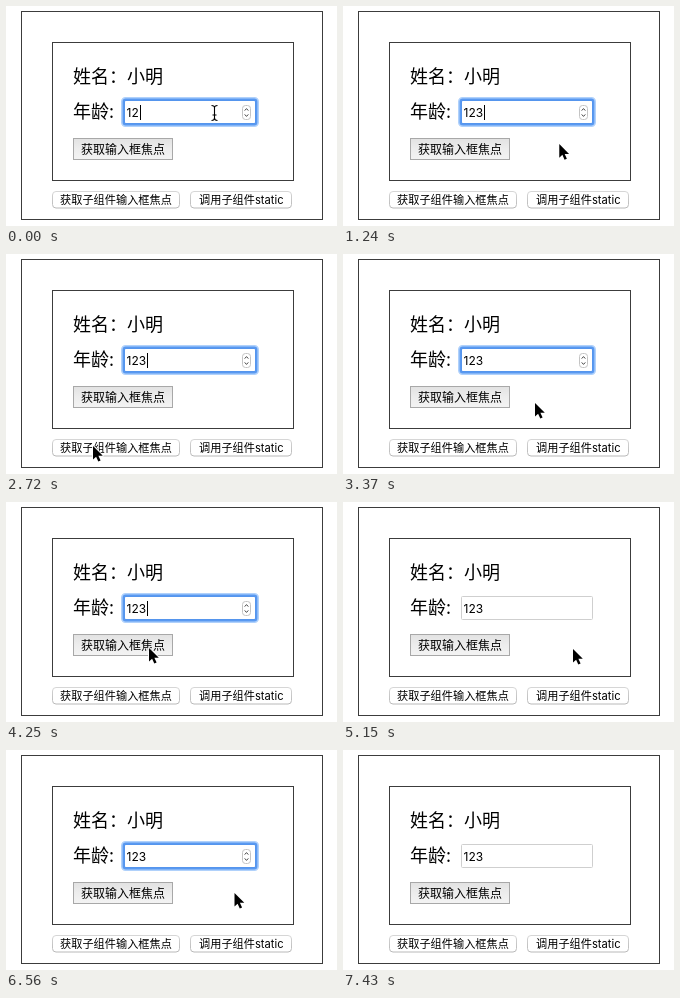
An HTML page for the animation above (7.8 s loop, 331x220 px).

```html
<!DOCTYPE html>
<html lang="zh-CN">
<head>
<meta charset="utf-8">
<title>Focus demo</title>
<style>
html, body { margin: 0; width: 100%; height: 100%; overflow: hidden; background: #fff; }
svg { display: block; width: 331px; height: 220px; }
text { font-family: "Inter", "Noto Sans CJK SC", sans-serif; fill: #000; white-space: pre; }
.label { font: 18px "Noto Sans CJK SC", sans-serif; }
.field { font-size: 12px; }
.small { font-size: 11.2px; }
.frame { fill: none; stroke: #3c3c3c; }
</style>
</head>
<body>
<svg viewBox="0 0 331 220">
  <defs>
    <linearGradient id="gray" x2="0" y2="1">
      <stop offset="0" stop-color="#e2e2e2"/>
      <stop offset=".5" stop-color="#ededed"/>
      <stop offset="1" stop-color="#f3f3f3"/>
    </linearGradient>
    <linearGradient id="blue" x2="0" y2="1">
      <stop offset="0" stop-color="#6db3fa"/>
      <stop offset="1" stop-color="#1a82fb"/>
    </linearGradient>
    <linearGradient id="edge" x2="0" y2="1">
      <stop offset="0" stop-color="#d6d6d6"/>
      <stop offset="1" stop-color="#b8b8b8"/>
    </linearGradient>
  </defs>

  <rect class="frame" x="15.5" y="5.5" width="301" height="208"/>
  <rect class="frame" x="46.5" y="36.5" width="241" height="138"/>
  <text class="label" x="67" y="76.5">姓名：小明</text>
  <text class="label" x="67" y="111.5">年龄:</text>

  <rect x="118.5" y="94.5" width="131" height="23" rx="1" fill="#fff" stroke="#cfcfcf"/>
  <g id="focus">
    <rect x="117" y="93" width="134" height="26" rx="2.5" fill="none" stroke="#3b8cf5" stroke-opacity=".4" stroke-width="4"/>
    <rect x="117.8" y="93.8" width="132.4" height="24.4" rx="2" fill="none" stroke="#4a90f0" stroke-opacity=".85" stroke-width="2.4"/>
    <rect x="236.5" y="99.5" width="8" height="14" rx="3" fill="#fff" stroke="#c4c4c4"/>
    <path d="M238.7 104.6l1.8-2 1.8 2M238.7 108.4l1.8 2 1.8-2" fill="none" stroke="#444"/>
  </g>
  <text class="field" id="value" x="120.6" y="111"></text>
  <rect id="caret" y="99" width="1" height="15"/>

  <rect id="inner" x="67.5" y="132.5" width="99" height="21" fill="url(#gray)" stroke="#a8a8a8"/>
  <text x="75" y="147.5" font-size="12">获取输入框焦点</text>

  <rect id="outer" x="46.5" y="185.5" width="127" height="16.5" rx="3.5" stroke="url(#edge)"/>
  <text class="small" x="54" y="198.2">获取子组件输入框焦点</text>
  <rect x="184.5" y="185.5" width="101" height="16.5" rx="3.5" fill="#fff" stroke="url(#edge)"/>
  <text class="small" x="193" y="198.2">调用子组件static</text>

  <g id="arrow">
    <path d="M0 0V13.6L3.1 10.7 5.3 15.6 7.6 14.6 5.4 9.8H9.8Z" stroke="#fff" stroke-width="1.8" paint-order="stroke" stroke-linejoin="round"/>
  </g>
  <g id="beam" fill="none">
    <path d="M-3 -7.5Q0 -7.5 0 -5V5Q0 7.5 -3 7.5M3 -7.5Q0 -7.5 0 -5V5Q0 7.5 3 7.5M-2 2H2" stroke="#fff" stroke-width="2.4" stroke-opacity=".7"/>
    <path d="M-3 -7.5Q0 -7.5 0 -5V5Q0 7.5 -3 7.5M3 -7.5Q0 -7.5 0 -5V5Q0 7.5 3 7.5M-2 2H2" stroke="#000" stroke-width="1.1"/>
  </g>
</svg>
<script>
const LOOP = 7800;
const $ = id => document.getElementById(id);
const [focus, value, caret, inner, outer, arrow, beam] =
  ["focus", "value", "caret", "inner", "outer", "arrow", "beam"].map($);

// Pointer moves: first step, last step, step count, end point.
const start = [208.5, 107];
const moves = [
  [1020, 1300, 6, 219, 149],
  [2010, 2130, 3, 88, 193],
  [2300, 2300, 1, 87, 192],
  [3020, 3370, 7, 192, 149],
  [3780, 3840, 2, 143, 146],
  [4670, 4790, 3, 230, 147],
  [5380, 5730, 7, 127, 192],
  [6380, 6560, 4, 228.5, 143],
  [7100, 7430, 7, 254, 224]
];
const focused = [[0, 1480], [2720, 3480], [4250, 5150], [5960, 6740]];
const caretOn = [[0, 480], [840, 1300], [2720, 3253], [4250, 4790], [5960, 6500]];
const outerDown = [[2660, 2720], [5910, 5960]];
const innerDown = [[4200, 4250]];

const within = (spans, t) => spans.some(([a, b]) => t >= a && t < b);
const smooth = p => p * p * (3 - 2 * p);
const show = (el, on) => el.setAttribute("visibility", on ? "visible" : "hidden");

function pointer(t) {
  let [x, y] = start;
  for (const [from, to, steps, endX, endY] of moves) {
    if (t < from) break;
    const gap = (to - from) / (steps - 1 || 1);
    const done = t >= to ? steps : Math.floor((t - from) / gap) + 1;
    const p = smooth(done / steps);
    x += (endX - x) * p;
    y += (endY - y) * p;
  }
  return [x, y];
}

function draw(t) {
  const typed = t >= 840;
  value.textContent = typed ? "123" : "12";
  caret.setAttribute("x", typed ? 141 : 134);
  show(caret, within(caretOn, t));
  show(focus, within(focused, t));
  inner.setAttribute("fill", within(innerDown, t) ? "#c6c6c6" : "url(#gray)");
  outer.setAttribute("fill", within(outerDown, t) ? "url(#blue)" : "#fff");

  const [x, y] = pointer(t);
  const overField = x > 118 && x < 250 && y > 94 && y < 118;
  show(beam, overField);
  show(arrow, !overField);
  (overField ? beam : arrow).setAttribute("transform", `translate(${x} ${y})`);
}

const origin = performance.now();
function tick() {
  draw((performance.now() - origin) % LOOP);
  requestAnimationFrame(tick);
}
draw(0);
requestAnimationFrame(tick);
</script>
</body>
</html>
```
